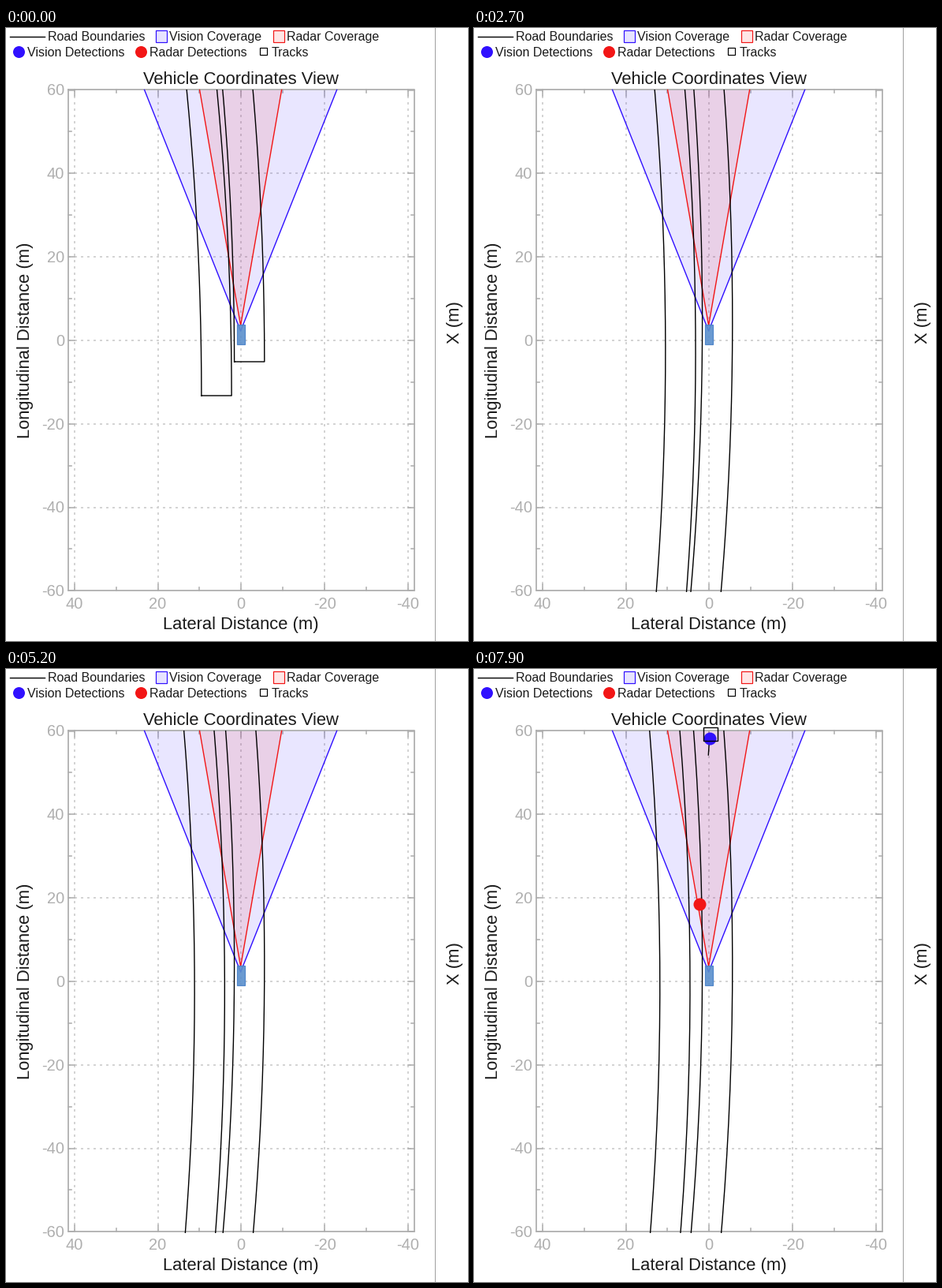
A matplotlib script that plays this animation: 586 by 777 pixels, repeating every 8000 ms.

```python
import numpy as np
import matplotlib.pyplot as plt
from matplotlib.animation import FuncAnimation
from matplotlib.patches import Polygon, Rectangle

W, H, DPI = 586, 777, 100
PX = 72 / DPI                       # points per pixel
BLUE, RED, GRAY = "#3010ff", "#f21616", "#afafaf"
L, R, T, B = 79, 517.6, 78.5, 713   # plot frame
CX, CY, SCALE = 298, 396, 5.29      # vehicle position, pixels per metre

plt.rcParams["font.family"] = "Liberation Sans"
fig = plt.figure(figsize=((W + .01) / DPI, (H + .01) / DPI), dpi=DPI, facecolor="white")
ax = fig.add_axes([0, 0, 1, 1])
ax.set_xlim(0, W)
ax.set_ylim(H, 0)
ax.axis("off")


def line(xs, ys, color="black", width=1.4, z=3, **kw):
    return ax.plot(xs, ys, color=color, lw=width * PX, zorder=z, **kw)[0]


def text(x, y, s, size, color="#1a1a1a", ha="left", rot=0):
    ax.text(x, y + .5, s, fontsize=size * PX, color=color, ha=ha, va="baseline",
            rotation=rot, rotation_mode="anchor", zorder=8)


def dot(x, y, color, size=16):
    return line([x], [y], color, marker="o", ms=size * PX, mew=0, ls="", z=6)


def box(x, y, w, h, face, edge, z=3, width=1.2):
    patch = Rectangle((x, y), w, h, fc=face, ec=edge, lw=width * PX, zorder=z)
    ax.add_patch(patch)
    return patch


def grid(xs, ys):
    line(xs, ys, "#d4d4d4", 2, z=1, ls=(0, (1.5, 2.5)))


def draw_axes():
    for m in range(-40, 41, 10):
        x = CX + .3 - m * SCALE
        major = m % 20 == 0
        size = 8 if major else 4
        line([x, x], [B, B - size], GRAY, 1.6)
        line([x, x], [T, T + size], GRAY, 1.6, z=1.5)
        if major:
            grid([x, x], [B, T])
            text(x, 735, str(m), 20, GRAY, "center")
    for m in range(-60, 61, 10):
        y = CY - m * SCALE
        major = m % 20 == 0
        size = 8 if major else 4
        line([L, L + size], [y, y], GRAY, 1.6)
        line([R, R - size], [y, y], GRAY, 1.6)
        if major:
            if abs(m) < 60:
                grid([L, R], [y, y])
            text(74, y + 6.2, str(m), 20, GRAY, "right")
    line([L, R, R, L, L], [T, T, B, B, T], GRAY, 1.8, z=2.2)
    text(297.5, 70.5, "Vehicle Coordinates View", 22, ha="center")
    text(297.5, 761, "Lateral Distance (m)", 22, ha="center")
    text(29.5, 395, "Longitudinal Distance (m)", 22, ha="center", rot=90)
    text(574.5, 373, "X (m)", 22, ha="center", rot=90)
    line([543.5, 543.5], [-1, H + 1], "#a0a0a0", 1, z=1)


def draw_legend():
    line([5, 49], [11, 11])
    box(189.5, 3, 14, 15, "#e7e3ff", BLUE)
    box(338.5, 3, 14, 15, "#ffe6e6", RED)
    dot(16.3, 30, BLUE, 15)
    dot(171, 30, RED, 15)
    box(321.5, 25.5, 9, 9, "white", "black")
    for x, y, s in [(52.5, 15, "Road Boundaries"), (207, 15, "Vision Coverage"),
                    (356, 15, "Radar Coverage"), (26.5, 35, "Vision Detections"),
                    (181.5, 35, "Radar Detections"), (337, 35, "Tracks")]:
        text(x, y, s, 16)


def draw_coverage():
    mid = CX - .4
    for apex, half, color in [(384, 122, BLUE), (377, 52, RED)]:
        pts = [(mid - half, T), (mid, apex), (mid + half, T)]
        ax.add_patch(Polygon(pts, fc=color, alpha=.1, lw=0, zorder=2))
        line(*zip(*pts), color, 1.4, z=2.5)
    car = box(292.5, 376, 10, 25, "#5a8fcc", "#4680c8", z=5)
    car.set_alpha(.9)


draw_axes()
draw_legend()
draw_coverage()

RADIUS, ROAD_W = 4023, 38.2
clip = Rectangle((L, 78), R - L, 637, transform=ax.transData)
roads = [line([], [], z=4) for _ in range(2)]
for road in roads:
    road.set_clip_path(clip)

vision = dot(0, 0, BLUE)
radar = dot(0, 0, RED)
speed = line([], [], z=5.5)
track = box(0, 0, 18, 17.5, "none", "black", z=7, width=1.4)

HOLDS = (2, 21, 51, 58)             # ticks on which nothing moves
RADAR_HITS = {35: (324, 135), 44: (341, 105), 63: (325, 83), 79: (285.7, 298)}
VISION_HITS = {72: (372, 120)}
TRACK_START = 75


def road_outline(cx, cy, start):
    """Closed strip between two concentric arcs, from the road start onwards."""
    a = np.linspace(start, .11, 90)
    inner, outer = RADIUS, RADIUS + ROAD_W
    xs = np.r_[inner * np.cos(a), outer * np.cos(a[::-1]), inner * np.cos(start)]
    ys = np.r_[inner * np.sin(a), outer * np.sin(a[::-1]), inner * np.sin(start)]
    return cx + xs, cy - ys


def update(i):
    n = i - sum(h <= i for h in HOLDS)
    travel = np.interp(n, [0, 1, 10, 75], [0, 11, 187.5, 1345])
    tangent = np.interp(n, [0, 1, 10, 18, 32, 49, 75],
                        [423, 434, 362, 371, 373, 375, 376])
    turn = (423 + travel - tangent) / RADIUS
    c, s = np.cos(turn), np.sin(turn)
    cx = 289.6 - RADIUS
    roads[0].set_data(*road_outline(cx, tangent, -turn))
    roads[1].set_data(*road_outline(cx - 41.7 * c - 43 * s,
                                    tangent + 43 * c - 41.7 * s, -turn))

    tracked = i >= TRACK_START
    y = 78 + (i - TRACK_START)
    track.set_visible(tracked)
    speed.set_visible(tracked)
    track.set_xy((290.5, y - 8.3))
    speed.set_data([299, 297.3], [y, y + 27])

    seen = VISION_HITS.get(i, (298.7, y + 6) if tracked else None)
    for mark, hit in [(vision, seen), (radar, RADAR_HITS.get(i))]:
        mark.set_visible(hit is not None)
        if hit:
            mark.set_data([hit[0]], [hit[1]])
    return [*roads, vision, radar, speed, track]


anim = FuncAnimation(fig, update, frames=80, interval=100, repeat=True,
                     repeat_delay=0, blit=False)
plt.show()
```
